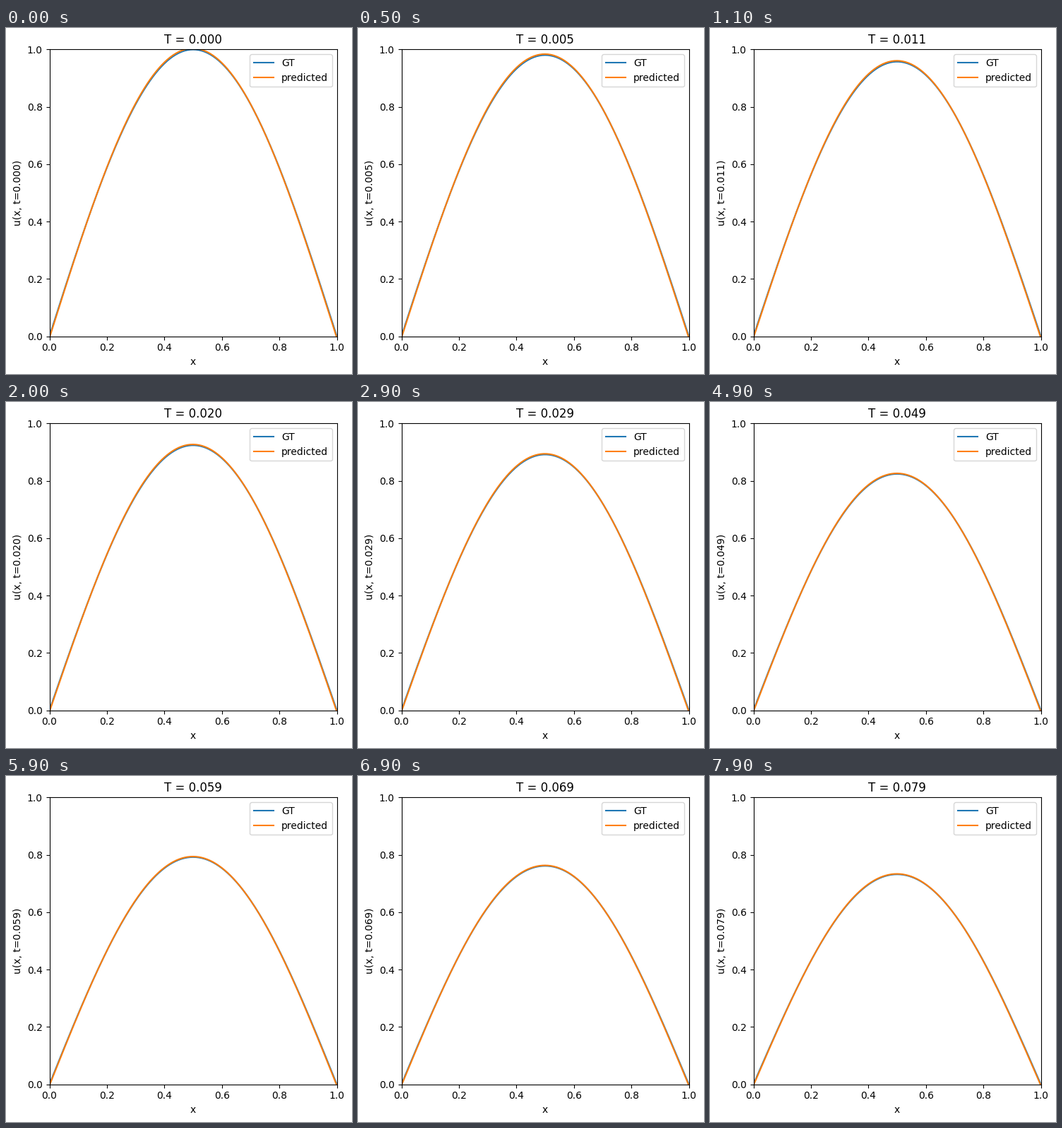
Recreate the animation shown at these times as a matplotlib script. Size 490 by 490 pixels, loop 8000 ms.

```python
import matplotlib.pyplot as plt
import numpy as np
from matplotlib.animation import FuncAnimation

SIZE, DPI = 490, 100
FRAMES, INTERVAL = 80, 100
DT = 0.001
DECAY = 0.4 * np.pi**2

x = np.linspace(0, 1, 201)


def exact(t):
    """Heat equation solution for a sine start."""
    return np.exp(-DECAY * t) * np.sin(np.pi * x)


def approximate(t):
    """Solution with a small smooth error that shrinks over time."""
    fade = np.exp(-t / 0.055)
    edge = -0.0035 - 0.0025 * fade
    bump = 0.0045 + 0.0055 * fade
    skew = 0.0005 + 0.0012 * fade
    return exact(t) + edge + bump * np.sin(np.pi * x) + skew * np.sin(2 * np.pi * x)


fig = plt.figure(figsize=(SIZE / DPI, SIZE / DPI), dpi=DPI)
left, right, top, bottom = 61.5, 468.5, 30.5, 436.5
ax = fig.add_axes([left / SIZE, 1 - bottom / SIZE,
                   (right - left) / SIZE, (bottom - top) / SIZE])
ax.set(xlim=(0, 1), ylim=(0, 1), xlabel="x")

truth, = ax.plot(x, exact(0), label="GT")
guess, = ax.plot(x, approximate(0), label="predicted")
ax.legend(loc="upper right")


def update(i):
    t = i * DT
    truth.set_ydata(exact(t))
    guess.set_ydata(approximate(t))
    ax.set_title(f"T = {t:.3f}")
    ax.set_ylabel(f"u(x, t={t:.3f})")
    return truth, guess


anim = FuncAnimation(fig, update, frames=FRAMES, interval=INTERVAL,
                     repeat=True, repeat_delay=0)
plt.show()
```
